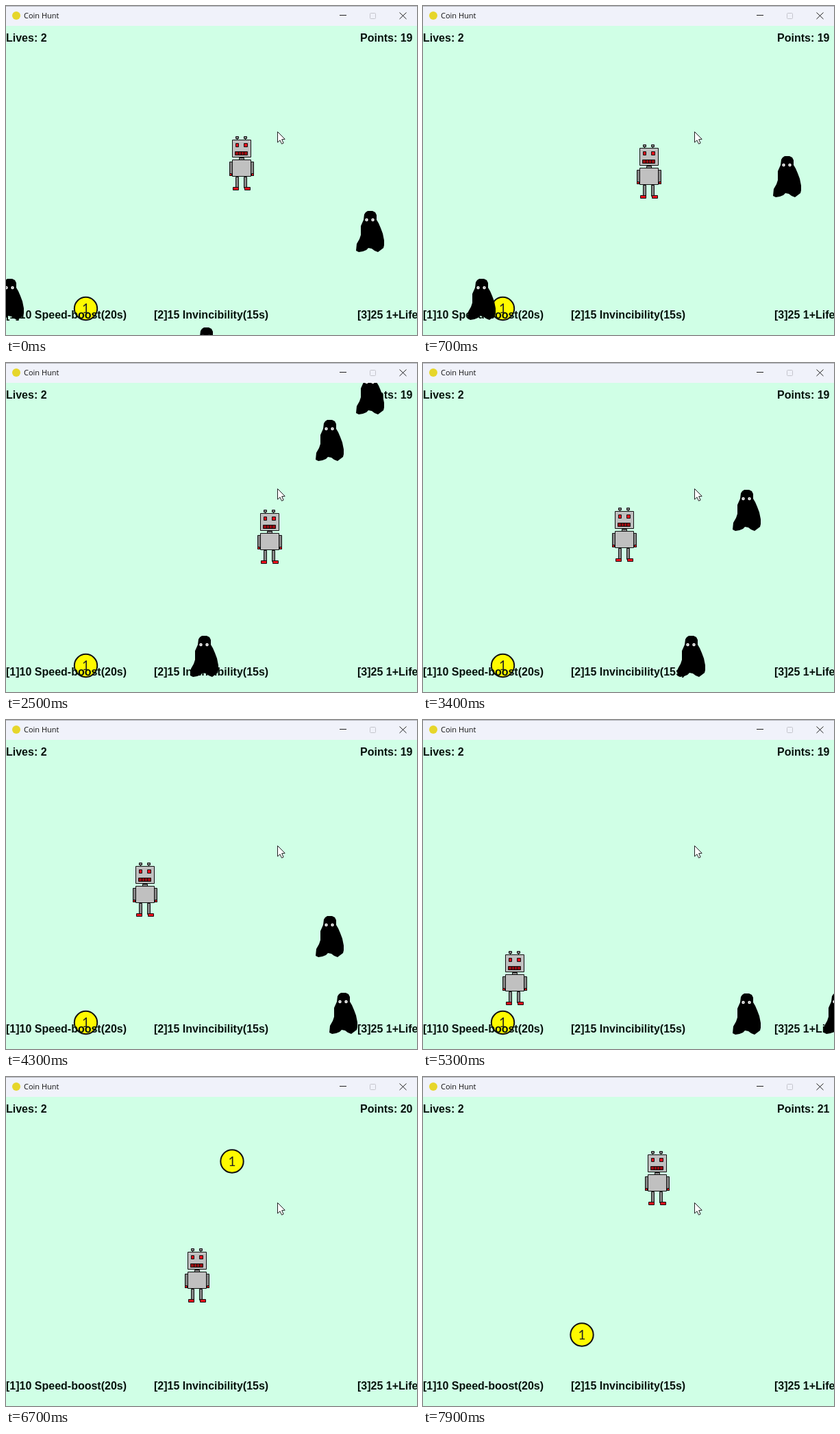
These frames come from a looping animation (600 by 480 pixels, 8 s). An HTML page:

```html
<!DOCTYPE html>
<html lang="en">
<head>
<meta charset="utf-8">
<title>Coin Hunt</title>
<style>
  html, body { margin: 0; width: 100%; height: 100%; overflow: hidden; background: #d0ffe6; }
  svg { display: block; width: 600px; height: 480px; }
  .hud { font: bold 16px "Liberation Sans", Arial, sans-serif; fill: #06120c; }
  .title { font: 11px "Open Sans", "Noto Sans", sans-serif; fill: #111; }
  .value { font: 19px Lato, sans-serif; text-anchor: middle; fill: #222; }
</style>
</head>
<body>
<svg viewBox="0 0 600 480">
  <defs>
    <g id="ghost">
      <path d="M11 13L12 5 14 2 17 0H24L28 2 30 6V13L33 18 36 25 39 33 41 43V50L40 54 36 57 32 60 27 58 23 55 18 54 15 57 10 59 4 60 0 58 1 48 5 41 7 35V22Z"/>
      <g fill="#fff">
        <circle cx="15.5" cy="13" r="2.2"/><circle cx="24.5" cy="13" r="2.2"/>
      </g>
      <path d="M15 12.5h1v1h-1zM24 12.5h1v1h-1z"/>
    </g>
  </defs>

  <rect width="600" height="480" fill="#d0ffe6"/>

  <g id="coin">
    <circle r="16.7" fill="#fffa00" stroke="#111" stroke-width="2"/>
    <text class="value" y="6.5">1</text>
  </g>

  <g class="hud">
    <text x="0" y="51.5">Lives: 2</text>
    <text id="points" x="517" y="51.5">Points: 19</text>
    <text x="0" y="455.5">[1]10 Speed-boost(20s)</text>
    <text x="216" y="455.5">[2]15 Invincibility(15s)</text>
    <text x="513" y="455.5">[3]25 1+Life</text>
  </g>

  <g id="ghosts"></g>

  <g id="robot" stroke="#111" stroke-width="1">
    <path d="M11.5 3v3M23.5 3v3" fill="none"/>
    <path d="M9.5.5h4v3h-4zM21.5.5h4v3h-4zM14.5 31.5h7v4h-7zM.5 37.5h4v20h-4zM31.5 37.5h4v20h-4zM9.5 59.5h4v16h-4zM21.5 59.5h4v16h-4z" fill="#858585"/>
    <path d="M4.5 5.5h27v25h-27zM4.5 34.5h27v24h-27z" fill="#c0c0c0"/>
    <path d="M9.5 10.5h4v5h-4zM21.5 10.5h5v5h-5zM.5 54.5h3v3h-3zM32.5 54.5h3v3h-3zM5.5 74.5h8v4h-8zM22.5 74.5h8v4h-8z" fill="#f0101c"/>
    <path d="M8.5 22.5h18v5h-18z" fill="#9b0a10"/>
    <path d="M13.5 23v4M17.5 23v4M21.5 23v4" fill="none"/>
  </g>

  <rect width="600" height="29" fill="#f0f2fa"/>
  <path d="M0 .5H600" stroke="#b4b6bc"/>
  <circle cx="15" cy="14" r="6" fill="#e6d62a"/>
  <text class="title" x="26" y="18">Coin Hunt</text>
  <g fill="none" stroke="#222">
    <path d="M487 13.5h10M574.5 9.5l10 9.5M584.5 9.5l-10 9.5"/>
    <rect x="531.5" y="10.5" width="8" height="8" rx="1" stroke="#c4c5cc"/>
  </g>

  <path transform="translate(396.5 183.5)" d="M0 0V15.5L3.5 12.3 6 17.7 8.6 16.5 6.2 11.2 10.7 10.8Z" fill="#fff" stroke="#222"/>
</svg>

<script>
const LOOP = 8, STEP = 0.1;
const find = id => document.getElementById(id);

// Rows of [seconds, ...values], joined by straight segments.
const travelKeys = [[0, 0], [1.4, 160], [2.5, 284], [4.3, 487], [5.3, 600], [8, 905]];
const robotKeys = [
  [0, 326, 190], [1.4, 298, 214], [2.5, 367, 214], [4.3, 185, 208],
  [5.3, 116, 337], [5.5, 116, 350], [6.7, 261, 250], [7.9, 324, 108]
];
// [seconds, x, y, points], held until the next row.
const coinKeys = [[0, 116.5, 441.5, 19], [5.4, 330, 123, 20], [7.6, 232, 376, 21]];
// Start place and direction; all share one speed.
const ghosts = [
  { x: 511, y: 299, dx: 0, dy: -1 },
  { x: -15, y: 398, dx: 1, dy: 0 },
  { x: 272, y: 469, dx: 0, dy: 1 },
  { x: 452, y: -201, dx: 0, dy: 1 }
];

for (const ghost of ghosts) {
  ghost.node = document.createElementNS("http://www.w3.org/2000/svg", "use");
  ghost.node.setAttribute("href", "#ghost");
  find("ghosts").append(ghost.node);
}

function tween(keys, t) {
  const next = keys.findIndex(key => key[0] > t);
  if (next < 0) return keys.at(-1).slice(1);
  const a = keys[next - 1], b = keys[next];
  const part = (t - a[0]) / (b[0] - a[0]);
  return a.slice(1).map((v, i) => Math.round(v + (b[i + 1] - v) * part));
}

const place = (node, x, y) => node.setAttribute("transform", `translate(${x} ${y})`);

function draw(t) {
  const [travel] = tween(travelKeys, t);
  for (const { node, x, y, dx, dy } of ghosts) place(node, x + dx * travel, y + dy * travel);

  place(find("robot"), ...tween(robotKeys, t));

  const [, x, y, points] = coinKeys.findLast(key => key[0] <= t);
  place(find("coin"), x, y);
  find("points").textContent = `Points: ${points}`;
}

const start = performance.now();
function tick() {
  const seconds = (performance.now() - start) / 1000 % LOOP;
  draw(Math.floor(seconds / STEP + 1e-6) * STEP + 1e-6);
  requestAnimationFrame(tick);
}
tick();
</script>
</body>
</html>
```
